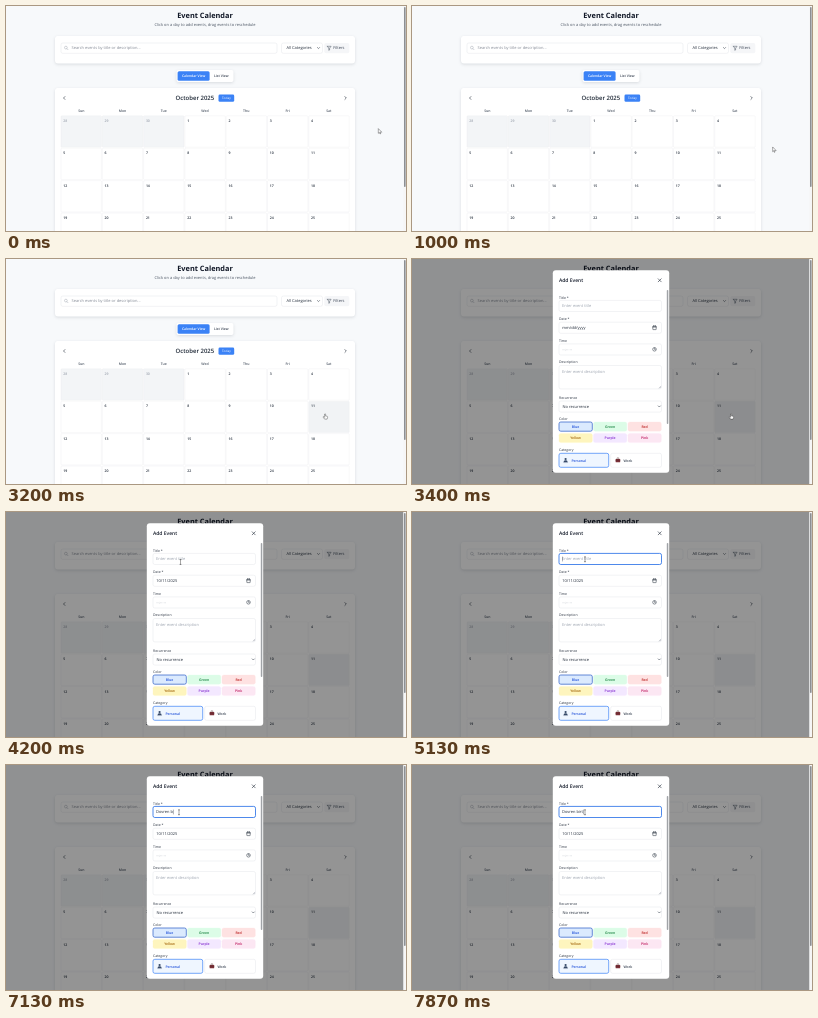
Recreate the animation shown at these times as an HTML page. Size 400 by 225 pixels, loop 8 s.

```html
<!DOCTYPE html>
<html lang="en">
<head>
<meta charset="utf-8">
<title>Event Calendar</title>
<style>
  html, body { margin: 0; width: 100%; height: 100%; overflow: hidden; background: #f7f9fb; }
  svg { display: block; width: 400px; height: 225px; }
  text { font-family: "Open Sans", "Noto Sans", sans-serif; text-rendering: geometricPrecision; white-space: pre; }
  .card { filter: drop-shadow(0 1px 1.5px rgba(15, 23, 42, .13)); }
</style>
</head>
<body>
<svg id="stage" viewBox="0 0 400 225"></svg>
<script>
const LOOP = 8000, OPEN_AT = 3400, FOCUS_AT = 4670;
const BODY = 3.98, SMALL = 3.48;
const INK = '#1f2937', MUTED = '#9ca3af', LINE = '#d9dce1', BLUE = '#3b82f6';
const GRID = { x: 55, y: 109.8, dx: 41.3, dy: 32.4, w: 40.4, h: 31.4 };

const rect = (x, y, w, h, fill, r = 0, extra = '') =>
  `<rect x="${x}" y="${y}" width="${w}" height="${h}" rx="${r}" fill="${fill}" ${extra}/>`;
const box = (x, y, w, h, fill = '#fff', stroke = LINE, width = .35) =>
  rect(x, y, w, h, fill, 1.8, `stroke="${stroke}" stroke-width="${width}"`);
// Text is placed by the middle of its line.
const text = (x, cy, str, size = BODY, fill = INK, weight = 400, anchor = 'start', extra = '') =>
  `<text x="${x}" y="${cy + size * .35}" font-size="${size}" fill="${fill}" font-weight="${weight}" text-anchor="${anchor}" ${extra}>${str}</text>`;
const path = (d, stroke = INK, width = .5, fill = 'none') =>
  `<path d="${d}" fill="${fill}" stroke="${stroke}" stroke-width="${width}" stroke-linecap="round" stroke-linejoin="round"/>`;
const chevron = (x, y, color) => path(`M${x - 1.1} ${y - .5}l1.1 1.1 1.1-1.1`, color);

function header() {
  return text(199, 9.3, 'Event Calendar', 7.35, '#111827', 700, 'middle')
    + text(199, 18.8, 'Click on a day to add events, drag events to reschedule', BODY, '#4b5563', 400, 'middle')
    + rect(49, 30, 300, 27.5, '#fff', 3, 'class="card"')
    + box(55, 37, 216, 10.3)
    + `<circle cx="59.9" cy="41.6" r="1.4" fill="none" stroke="${MUTED}" stroke-width=".45"/>`
    + path('M61 42.7l1 1', MUTED)
    + text(65.5, 42, 'Search events by title or description...', BODY, '#858b96')
    + box(275.5, 37, 41, 10.3) + text(280.5, 42, 'All Categories') + chevron(312.5, 42)
    + rect(318.3, 37, 25, 10.3, '#f5f6f8', 1.8)
    + path('M321.3 40.3h3.8l-1.5 1.9v1.7l-.8.5v-2.2z', '#374151', .45)
    + text(327.3, 42, 'Filters', BODY, '#374151')
    + rect(170.5, 64, 57, 12, '#fff', 2, 'class="card"')
    + rect(171.6, 65.2, 32, 9.6, BLUE, 1.5)
    + text(187.6, 70, 'Calendar View', 3.42, '#fff', 600, 'middle')
    + text(215.3, 70, 'List View', 3.42, '#374151', 600, 'middle');
}

function cells() {
  let out = '';
  for (let i = 0; i < 28; i++) {
    const x = GRID.x + i % 7 * GRID.dx, y = GRID.y + Math.floor(i / 7) * GRID.dy;
    const outside = i < 3;
    out += rect(x, y, GRID.w, GRID.h, outside ? '#f3f5f7' : 'none', .8, 'stroke="#e9ebee" stroke-width=".35"')
      + text(x + 2.3, y + 5, outside ? 28 + i : i - 2, SMALL, outside ? MUTED : INK, 600);
  }
  return out;
}

function calendar() {
  const days = ['Sun', 'Mon', 'Tue', 'Wed', 'Thu', 'Fri', 'Sat'];
  return rect(49, 82, 300, 160, '#fff', 3, 'class="card"')
    + path('M58.9 90.6l-1.4 1.4 1.4 1.4', INK, .6) + path('M338.9 90.6l1.4 1.4-1.4 1.4', INK, .6)
    + text(169.6, 92.3, 'October 2025', 5.97, INK, 600)
    + rect(212.5, 88.6, 15.7, 7.2, BLUE, 1.4)
    + text(220.4, 92.2, 'Today', 3.15, '#fff', 400, 'middle')
    + days.map((d, i) => text(75.3 + i * 41.25, 105.2, d, SMALL, '#4b5563', 600, 'middle')).join('')
    + `<rect id="hover" width="${GRID.w}" height="${GRID.h}" rx=".8" fill="#f1f3f5"/>`
    + cells();
}

function swatches() {
  const colors = [
    ['Blue', '#dbeafe', '#1d4ed8'], ['Green', '#dcfce7', '#15803d'], ['Red', '#fee2e2', '#b91c1c'],
    ['Yellow', '#fef5be', '#a16207'], ['Purple', '#f3e8ff', '#7e22ce'], ['Pink', '#fce7f3', '#be185d']];
  return colors.map(([name, fill, ink], i) => {
    const x = 147 + i % 3 * 34.5, y = 163 + Math.floor(i / 3) * 11.4;
    return box(x, y, 33.3, 9.2, fill, i ? fill : '#3565c9', i ? .3 : .75)
      + text(x + 16.6, y + 4.6, name, SMALL, ink, 600, 'middle');
  }).join('');
}

function modal() {
  const label = (y, str) => text(147, y, str, SMALL, '#28313f', 500);
  const field = (y, h = 11.1) => box(147, y, 102.5, h);
  return rect(0, 0, 397.5, 225, '#000', 0, 'opacity=".42"')
    + rect(140.8, 11.3, 116.4, 202.4, '#fff', 3)
    + text(147, 21.4, 'Add Event', 4.97, '#111827', 600)
    + path('M246.2 19.8l3 3m0-3l-3 3', INK, .6)
    + rect(254.8, 31, 1.5, 134, '#a0a3a7', .7)
    + label(38.3, 'Title *')
    + `<rect id="titleField" x="147" y="41.4" width="102.5" height="11.1" rx="1.8" fill="#fff"/>`
    + text(150, 47, '', BODY, INK, 400, 'start', 'id="title"')
    + rect(0, 44.6, .35, 4.8, INK, 0, 'id="caret"')
    + label(59.6, 'Date *') + field(63.2)
    + text(150.3, 68.8, '', BODY, INK, 400, 'start', 'id="date"')
    + rect(240.8, 67.2, 3.4, 3.4, 'none', .3, `stroke="${INK}" stroke-width=".5"`)
    + path('M240.8 68h3.4M241.7 66.6v.6M243.3 66.6v.6', INK, .6)
    + label(81.4, 'Time') + field(84.9)
    + text(150.3, 90.4, '--:-- --', BODY, MUTED)
    + `<circle cx="242.5" cy="90.3" r="1.8" fill="none" stroke="${INK}" stroke-width=".5"/>`
    + path('M242.5 89.2v1.2h.9', INK, .45)
    + label(102.8, 'Description') + field(106.5, 23.4)
    + text(150, 112.4, 'Enter event description', BODY, MUTED)
    + path('M247 129l1.8-1.8m-.8 1.8l.8-.8', '#6b7280', .3)
    + label(138.4, 'Recurrence') + field(142) + text(150.5, 147.4, 'No recurrence')
    + chevron(247.3, 147.4)
    + label(159.3, 'Color') + swatches()
    + label(190.3, 'Category')
    + box(147, 194.3, 49.7, 14, '#eff6ff', BLUE, .7)
    + '<circle cx="153.6" cy="200" r="1.1" fill="#374a68"/>'
    + path('M151.6 203.2q0-1.9 2-1.9t2 1.9z', '#374a68', .2, '#374a68')
    + text(159.4, 201.3, 'Personal', SMALL, '#1d4ed8', 600)
    + box(198.7, 194.3, 50.8, 14)
    + rect(203.6, 200, 4.6, 3.2, '#7b3038', .5) + path('M205 199.8v-.9h1.8v.9', '#4a2528', .4)
    + path('M203.8 201.4h4.2', '#4a2528', .3)
    + text(211.4, 201.3, 'Work', SMALL, '#374151', 600);
}

const arrow = path('M0 0v4.3l1-.9.7 1.6.7-.3-.7-1.5h1.4z', '#111', .35, '#fff');
const hand = path('M-.2-1.6q.6-.5.8.2v1.8l1.6.4q.6.3.4 1.1l-.5 1.7h-2.5l-1.5-2q0-.7.7-.5l.7.5z', '#111', .35, '#fff');
const beam = path('M-.6-2.4h1.2m-.6 0v4.8m-.6 0h1.2', '#222', .4);

document.getElementById('stage').innerHTML =
  rect(0, 0, 400, 225, '#f7f9fb') + header() + calendar()
  + `<g id="modal">${modal()}</g>`
  + rect(397.5, 0, 2.5, 225, '#f6f6f6') + rect(398, 1, 1.6, 180, '#8c8f93', .8)
  + `<g id="pointer"><g id="arrow">${arrow}</g><g id="hand">${hand}</g><g id="beam">${beam}</g></g>`;

const $ = id => document.getElementById(id);
const show = (id, on) => $(id).setAttribute('visibility', on ? 'inherit' : 'hidden');

// Pointer stops: time, x, y.
const stops = [
  [0, 372.3, 123], [600, 372.3, 123], [1330, 352, 155], [1800, 352, 155], [2000, 348.5, 106.5],
  [2530, 319, 156.5], [3400, 319, 156.5], [4200, 174.5, 50], [4270, 174.5, 50], [4470, 173, 47.3], [LOOP, 173, 47.3]];
const typed = 'Dovren birt';
const keyTimes = [5200, 5530, 5800, 6000, 6130, 6270, 6530, 7130, 7330, 7530, 7870];

function pointerAt(t) {
  const i = stops.findIndex(s => s[0] > t);
  const [t0, x0, y0] = stops[i - 1], [t1, x1, y1] = stops[i];
  const p = (t - t0) / (t1 - t0), e = p * p * (3 - 2 * p);
  return [x0 + (x1 - x0) * e, y0 + (y1 - y0) * e];
}

function draw(t) {
  const open = t >= OPEN_AT, focused = t >= FOCUS_AT;
  const [x, y] = pointerAt(t);
  const [px, py] = open ? [319, 156.5] : [x, y];
  const col = Math.floor((px - GRID.x) / GRID.dx), row = Math.floor((py - GRID.y) / GRID.dy);
  const overCell = col >= 0 && col < 7 && row >= 0;
  show('hover', overCell);
  $('hover').setAttribute('x', GRID.x + col * GRID.dx);
  $('hover').setAttribute('y', GRID.y + row * GRID.dy);

  show('modal', open);
  const value = typed.slice(0, keyTimes.filter(k => k <= t).length);
  $('title').textContent = value || 'Enter event title';
  $('title').setAttribute('fill', value ? INK : MUTED);
  $('caret').setAttribute('x', 150.1 + (value ? $('title').getComputedTextLength() : 0));
  show('caret', open && focused);
  $('titleField').setAttribute('stroke', focused ? '#2f74e8' : LINE);
  $('titleField').setAttribute('stroke-width', focused ? .85 : .35);
  $('date').textContent = t < OPEN_AT + 65 ? 'mm/dd/yyyy' : '10/11/2025';

  const overTitle = open && x > 147 && x < 249.5 && y > 41.4 && y < 52.5;
  const useHand = overCell && (!open || t < OPEN_AT + 65);
  show('beam', overTitle);
  show('hand', useHand);
  show('arrow', !overTitle && !useHand);
  $('pointer').setAttribute('transform', `translate(${x} ${y})`);
}

function tick() {
  draw(performance.now() % LOOP);
  requestAnimationFrame(tick);
}
tick();
</script>
</body>
</html>
```
